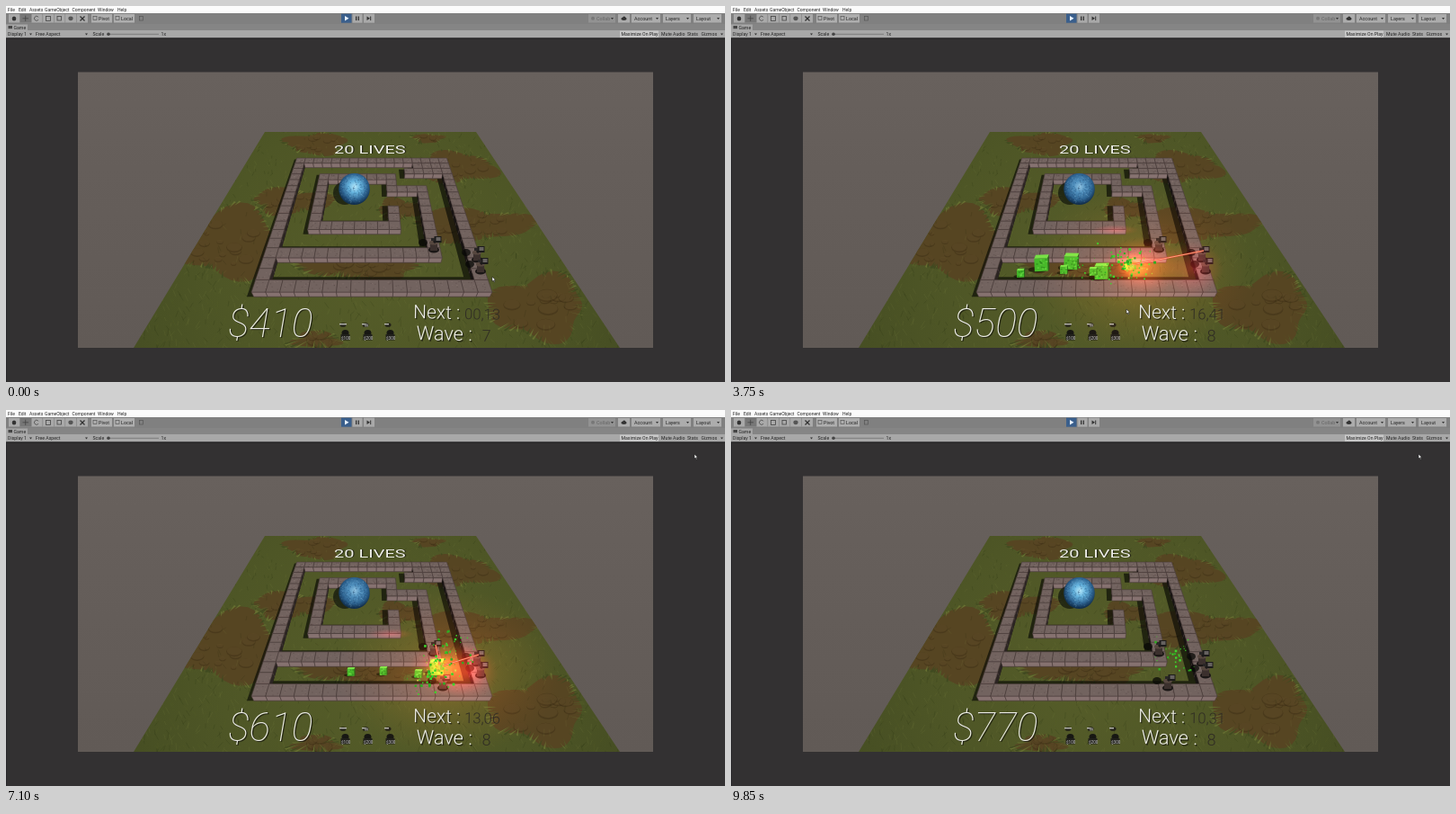
Animation, 800 px wide and 418 px high, one loop 9.9 s. Source, as an HTML page with a canvas:

```html
<!DOCTYPE html>
<html>
<head>
<meta charset="utf-8">
<style>
html, body { margin: 0; width: 100%; height: 100%; overflow: hidden; background: #333132; }
canvas { display: block; }
</style>
</head>
<body>
<canvas id="stage" width="800" height="418"></canvas>
<script>
const LOOP = 9900, W = 800, H = 418, TAU = Math.PI * 2;
const stage = document.getElementById('stage').getContext('2d');
const backdrop = document.createElement('canvas');
backdrop.width = W;
backdrop.height = H;
let g = backdrop.getContext('2d');

function random(seed) {
  return () => {
    seed = seed + 0x6D2B79F5 | 0;
    let n = Math.imul(seed ^ seed >>> 15, 1 | seed);
    n = n + Math.imul(n ^ n >>> 7, 61 | n) ^ n;
    return ((n ^ n >>> 14) >>> 0) / 4294967296;
  };
}
function box(x, y, w, h, fill) { g.fillStyle = fill; g.fillRect(x, y, w, h); }
function oval(x, y, rx, ry, fill) {
  g.fillStyle = fill;
  g.beginPath();
  g.ellipse(x, y, rx, ry, 0, 0, TAU);
  g.fill();
}
function trace(points) {
  points.forEach(([x, y], i) => i ? g.lineTo(x, y) : g.moveTo(x, y));
  g.closePath();
}
function poly(points, fill, edge) {
  g.beginPath();
  trace(points);
  g.fillStyle = fill;
  g.fill();
  if (edge) { g.strokeStyle = edge; g.lineWidth = .6; g.stroke(); }
}
function line(x1, y1, x2, y2, color, width) {
  g.strokeStyle = color;
  g.lineWidth = width;
  g.beginPath();
  g.moveTo(x1, y1);
  g.lineTo(x2, y2);
  g.stroke();
}
function text(str, x, y, size, fill, style = '400') {
  g.font = `${style} ${size}px Roboto, sans-serif`;
  g.fillStyle = fill;
  g.fillText(str, x, y);
}
function radial(x, y, r, stops) {
  const grad = g.createRadialGradient(x, y, 0, x, y, r);
  stops.forEach(([at, color]) => grad.addColorStop(at, color));
  return grad;
}

// Grid point to screen; z is the depth below the wall tops.
function project(col, row, z = 0) {
  const s = 1 / (.06346 + .00226 * (17 - row) + .0021 * z);
  return [407 + (col - 8.5) * s, -77 + s * (25.07 + 1.38 * z)];
}
const FLOOR = .6;

// Wall runs: first column, first row, last column, last row.
const RUNS = [
  [0, 0, 16, 0], [0, 1, 0, 16], [16, 1, 16, 16], [1, 16, 15, 16], [1, 13, 13, 13],
  [13, 1, 15, 1], [12, 2, 15, 2], [3, 3, 10, 3], [3, 4, 3, 10], [4, 10, 10, 10],
  [10, 8, 10, 9], [10, 4, 10, 4], [10, 5, 13, 5], [13, 6, 13, 12]
];

function arrow(x, y) { poly([[x, y], [x + 3, y], [x + 1.5, y + 2]], '#333'); }

function drawEditor() {
  box(0, 0, W, H, '#333132');
  box(0, 0, W, 8, '#fbfbfb');
  box(0, 8, W, 12, '#808080');
  box(0, 20, W, 7.5, '#858585');
  box(0, 20.5, 24, 7, '#a5a5a5');
  box(0, 27, W, 8.5, '#a8a8a8');
  box(0, 35.5, W, 1.2, '#242324');
  box(0, 36, 1, H, '#28272a');

  [['File', 2], ['Edit', 14], ['Assets', 26], ['GameObject', 43], ['Component', 73.5], ['Window', 102], ['Help', 124]]
    .forEach(([s, x]) => text(s, x, 5.6, 5, '#222'));

  box(3, 9, 88, 9.5, '#a9a9a9');
  box(15.5, 9, 12.5, 9.5, '#777');
  for (let i = 1; i < 7; i++) box(3 + i * 12.5, 9, .6, 9.5, '#808080');
  oval(9, 14, 2.3, 2.5, '#333');
  line(18.5, 13.8, 25, 13.8, '#444', .8);
  line(21.7, 10.7, 21.7, 17, '#444', .8);
  g.strokeStyle = '#444';
  g.beginPath();
  g.arc(34, 13.8, 2.5, .6, 5.6);
  g.stroke();
  [[44.5, 5], [57, 4.5]].forEach(([x, s]) => g.strokeRect(x, 11.5, s, s));
  oval(72, 13.8, 2.6, 2.4, '#555');
  line(82.5, 11.5, 87.5, 16.5, '#333', 1.2);
  line(87.5, 11.5, 82.5, 16.5, '#333', 1.2);
  [[95, 23, 'Pivot'], [120, 23, 'Local']].forEach(([x, w, s]) => {
    box(x, 9, w, 9.5, '#aeaeae');
    g.strokeStyle = '#555';
    g.lineWidth = .7;
    g.strokeRect(x + 2, 11.5, 4, 4);
    text(s, x + 8, 15.7, 5.4, '#222');
  });
  g.strokeRect(148.5, 11.5, 4, 4.5);

  box(373, 8.7, 11.5, 10, '#3a5f8c');
  box(385.5, 8.7, 11, 10, '#a9a9a9');
  box(398, 8.7, 12, 10, '#a9a9a9');
  poly([[377, 11], [381.5, 13.7], [377, 16.4]], '#e8f2ff');
  box(389, 11.5, 1.3, 4.6, '#333');
  box(391.6, 11.5, 1.3, 4.6, '#333');
  poly([[401.5, 11.5], [405, 13.8], [401.5, 16]], '#333');
  box(405.2, 11.5, 1, 4.6, '#333');

  [[648, 30, 'Collab', '#666'], [696, 32, 'Account', '#222'], [731, 31, 'Layers', '#222'], [765, 31, 'Layout', '#222']]
    .forEach(([x, w, s, c]) => {
      box(x, 9, w, 9.5, s === 'Collab' ? '#929292' : '#acacac');
      text(s, x + (s === 'Collab' ? 9 : 3), 15.7, 5.4, c);
      arrow(x + w - 5, 13);
    });
  oval(653, 13.7, 2, 2, '#777');
  box(681, 9, 13, 9.5, '#acacac');
  oval(687.5, 14.3, 3, 1.7, '#333');
  oval(687.8, 13, 1.6, 1.6, '#333');

  box(2.5, 22, 4.5, 3.2, '#444');
  text('Game', 8.5, 25.7, 5.2, '#222');
  box(683, 27.5, 43, 7.5, '#c8c8c8');
  [['Display 1', 2], ['Free Aspect', 33], ['Scale', 96.5], ['1x', 172.5], ['Maximize On Play', 684.5],
    ['Mute Audio', 729], ['Stats', 758], ['Gizmos', 773.5]].forEach(([s, x]) => text(s, x, 33.1, 5.2, '#222'));
  [26, 88, 795].forEach(x => arrow(x, 30.5));
  line(113, 31.3, 170, 31.3, '#707070', .8);
  oval(114, 31.3, 1.8, 1.8, '#444');
}

function drawGround() {
  const sky = g.createLinearGradient(0, 73, 0, 380);
  sky.addColorStop(0, '#68615d');
  sky.addColorStop(.35, '#655e5a');
  sky.addColorStop(1, '#615a56');
  box(80, 73.5, 640, 306.5, sky);

  g.save();
  g.beginPath();
  trace([[288, 140], [523, 140], [683, 380], [142, 380]]);
  g.clip();
  box(140, 140, 550, 240, radial(410, 290, 290, [[0, '#565d29'], [.6, '#4e5626'], [1, '#464e23']]));

  const rnd = random(7);
  const blades = (n, tones) => {
    for (let i = 0; i < n; i++) {
      const y = 140 + 245 * rnd(), x = 140 + 550 * rnd(), size = (y + 65) / 80;
      const lean = (rnd() - .5) * size * 2;
      line(x, y, x + lean, y - size * (.6 + rnd()), tones[i % tones.length], .7);
    }
  };
  blades(1800, ['rgba(34,44,14,.25)', 'rgba(124,134,64,.22)', 'rgba(86,98,40,.3)']);

  const patches = [
    [345, 153, 33, 12], [502, 180, 42, 17], [242, 262, 58, 38], [592, 335, 52, 35], [520, 243, 66, 18],
    [318, 217, 44, 14], [395, 291, 66, 13], [438, 226, 25, 12], [345, 371, 26, 9], [470, 147, 17, 5]
  ];
  for (const [px, py, rx, ry] of patches) {
    const phase = rnd() * 6;
    const rim = a => {
      const k = 1 + .16 * Math.sin(3 * a + phase) + .1 * Math.sin(5 * a - phase);
      return [px + rx * k * Math.cos(a), py + ry * k * Math.sin(a)];
    };
    const edge = Array.from({ length: 48 }, (_, i) => rim(i / 48 * TAU));
    poly(edge, '#564522');
    for (let i = 0; i < rx / 4; i++) {
      const a = rnd() * TAU, d = Math.sqrt(rnd()) * .7, r = (1.5 + rnd() * 4) * py / 250;
      const x = px + rx * d * Math.cos(a), y = py + ry * d * Math.sin(a);
      oval(x, y + .8, r * 1.6, r, 'rgba(48,34,16,.3)');
      oval(x, y, r * 1.5, r * .85, 'rgba(106,86,46,.4)');
    }
    const size = py / 34;
    for (let i = 0; i < rx * 1.6; i++) {
      const a = rnd() * TAU, [x, y] = rim(a), len = size * (.6 + rnd() * .7);
      const dx = Math.cos(a + rnd() - .5) * len, dy = Math.sin(a) * len * .6;
      poly([[x + dx * .4 - 1, y + dy * .4], [x + dx * .4 + 1, y + dy * .4 + 1], [x - dx, y - dy - 1]],
        ['#525b27', '#666f31', '#404a20'][i % 3]);
    }
  }
  blades(400, ['rgba(150,160,80,.15)', 'rgba(25,30,8,.2)']);
  g.restore();
}

function drawMaze() {
  const blocks = [];
  for (const [c0, r0, c1, r1] of RUNS)
    for (let r = r0; r <= r1; r++)
      for (let c = c0; c <= c1; c++) blocks.push([c, r]);
  blocks.sort((a, b) => a[1] - b[1] || Math.abs(b[0] - 8) - Math.abs(a[0] - 8));

  g.beginPath();
  for (const [c, r] of blocks)
    trace([[c - .5, r - .65], [c + 1, r - .65], [c + 1, r + 1], [c - .5, r + 1]]
      .map(([x, y]) => project(x, y, FLOOR)));
  g.fillStyle = 'rgba(10,11,5,.68)';
  g.fill();

  const rnd = random(21);
  for (const [c, r] of blocks) {
    const side = c < 8 ? c + 1 : c;
    poly([project(side, r), project(side, r + 1), project(side, r + 1, FLOOR), project(side, r, FLOOR)],
      c < 8 ? '#2b2422' : '#171312');
    const a = project(c, r + 1), b = project(c + 1, r + 1);
    poly([a, b, project(c + 1, r + 1, FLOOR), project(c, r + 1, FLOOR)], '#867270', '#4a3d3c');
    const p = project(c, r), q = project(c + 1, r);
    poly([p, q, b, a], '#72635f', '#483c3a');
    for (let i = 0; i < 8; i++) {
      const u = .1 + rnd() * .8, v = .1 + rnd() * .8, [x, y] = project(c + u, r + v);
      box(x, y, 1.4, .9, i % 2 ? 'rgba(165,140,135,.22)' : 'rgba(50,35,35,.2)');
    }
  }
}

function drawShop() {
  [375, 400, 425].forEach((x, i) => {
    oval(x, 354.5, 3.5, 2.3, '#222119');
    box(x - 4, 353, i ? 5 : 8, 1.4, '#b9b9b2');
    if (i === 1) box(x - 1, 353.5, 4, 3, '#74746e');
    oval(x + 2.5, 363.5, 4, 3.5, '#171713');
    box(x - 2.5, 365, 10, 6.5, '#20201b');
    text('$' + (i + 1) + '00', x - 2, 370.5, 4.6, '#ccc');
  });
}

drawEditor();
drawGround();
drawMaze();
drawShop();

// Enemies: big?, x at a known time, that time, lane y, time of death.
const BIG = 1, SMALL = 0, ENTRY = 304;
const enemies = [
  [BIG, 406, 2450, 287, 3320], [BIG, 360, 2450, 295, 4900], [BIG, 326, 2450, 284, 6550], [BIG, 345, 3750, 286, 7500],
  [SMALL, 391, 2450, 287, 2950], [SMALL, 374, 2450, 289, 3900], [SMALL, 335, 2450, 295, 5300],
  [SMALL, 370, 3750, 293, 5950], [SMALL, 322, 3750, 297, 6650], [SMALL, 391, 5800, 293, 7800],
  [SMALL, 352, 5800, 290, 8400], [SMALL, 316, 5800, 291, 9250]
].map(([big, x, at, lane, dies]) => {
  const speed = (big ? 40 : 52) / 1000;
  return { big, lane, dies, speed, born: Math.max(150, at - (x - ENTRY) / speed), x, at };
});
function place(e, t) {
  const x = e.x + (Math.min(t, e.dies) - e.at) * e.speed;
  return [Math.min(x, 493), e.lane - Math.max(0, x - 480) * 1.3];
}

// Fire: start, end, enemy index, turret bit mask.
const fire = [
  [1750, 3320, 0, 7], [3400, 3900, 5, 2], [3950, 4900, 1, 7], [4950, 5300, 6, 5], [5350, 5950, 7, 6],
  [5950, 6550, 2, 14], [6600, 7500, 3, 3], [7500, 7800, 9, 14], [7850, 8700, 10, 4], [8750, 9250, 11, 6]
];
const turrets = [[476, 267, 0], [524, 278, 0], [528, 291, 0], [486, 305, 5000]];
const money = [[0, 410], [3330, 460], [3600, 500], [4400, 510], [5000, 410], [5950, 460], [6550, 560],
  [6900, 610], [7500, 660], [7800, 690], [8400, 710], [9250, 770]];
const pointer = [[0, 542, 302], [2450, 486, 308], [3750, 441, 338], [4300, 405, 362], [5000, 487, 303],
  [5800, 504, 312], [6200, 520, 300], [6800, 767, 50], [9900, 766, 50]];

function drawCube(e, t) {
  const [x, y] = place(e, t), s = e.big ? 15 : 8;
  const grow = Math.min(1, (t - e.born) / 150);
  oval(x - s * .25, y + s * .48, s * .7, s * .22, 'rgba(8,15,2,.6)');
  g.save();
  g.translate(x, y);
  g.rotate(.04 * Math.sin(t / 260 + e.lane + e.x));
  g.scale(grow, grow);
  const h = s / 2;
  box(-h, -h * .75, s, s * .97, '#43b82a');
  poly([[-h, -h * .75], [-h + s * .13, -h * 1.25], [h + s * .1, -h * 1.25], [h, -h * .75]], '#74e046');
  poly([[h, -h * .75], [h + s * .1, -h * 1.25], [h + s * .1, h * .9], [h, h * 1.19]], '#1e6616');
  const rnd = random(Math.round(e.x));
  for (let i = 0; i < s; i++)
    box(-h + rnd() * (s - 2), -h * .7 + rnd() * s * .85, 2, 1.5, i % 2 ? 'rgba(120,235,80,.5)' : 'rgba(25,105,20,.45)');
  g.restore();
}

function drawTurret([x, y]) {
  oval(x - 12, y - 4, 5, 4, 'rgba(8,8,6,.75)');
  oval(x, y + 4, 6, 3.6, '#1b1716');
  box(x - 4, y - 4, 8, 9, '#3b302d');
  oval(x, y - 4, 5, 2.6, '#56473f');
  line(x, y - 4, x + 4, y - 8, '#191717', 3);
  box(x + .5, y - 11, 8, 7, '#1c1b1b');
  box(x + 2.5, y - 10, 5, 4, '#65615f');
  box(x - 3, y - 9, 4, 3, '#292626');
}

function drawOrb(calm) {
  oval(377, 208, 13, 13, 'rgba(5,9,6,.6)');
  oval(387.5, 203.5, 17.3, 17.6,
    radial(388, 201, 19, [[0, calm ? '#b7e9fb' : '#8fc3e2'], [.35, calm ? '#65b4df' : '#4f8fbd'], [.75, '#2d628f'], [1, '#12304e']]));
  const rnd = random(5);
  for (let i = 0; i < 170; i++) {
    const a = rnd() * TAU, d = Math.sqrt(rnd()) * 16;
    box(387 + d * Math.cos(a), 203 + d * Math.sin(a), 1.2, 1, i % 2 ? 'rgba(170,220,245,.2)' : 'rgba(15,45,85,.3)');
  }
}

function drawLight(x, y, flicker) {
  g.save();
  g.beginPath();
  g.rect(80, 73, 640, 307);
  g.clip();
  g.globalCompositeOperation = 'lighter';
  const glow = (cx, cy, r, flat, stops) => {
    g.save();
    g.translate(cx, cy);
    g.scale(1, flat);
    g.fillStyle = radial(0, 0, r, stops);
    g.fillRect(-r, -r, 2 * r, 2 * r);
    g.restore();
  };
  glow(x + 14, y + 6, 125, .75, [[0, `rgba(120,45,10,${.6 * flicker})`], [.5, 'rgba(80,30,6,.28)'], [1, 'rgba(50,12,0,0)']]);
  glow(x + 16, y, 46, .7, [[0, `rgba(190,50,20,${.6 * flicker})`], [.5, 'rgba(150,22,15,.35)'], [1, 'rgba(90,0,0,0)']]);
  glow(x + 6, y, 19, .85, [[0, `rgba(235,150,50,${.6 * flicker})`], [1, 'rgba(190,50,0,0)']]);
  glow(514, 292, 34, .9, [[0, 'rgba(170,15,35,.45)'], [1, 'rgba(120,0,15,0)']]);
  glow(428, 249, 26, .22, [[0, 'rgba(150,20,35,.4)'], [1, 'rgba(120,0,15,0)']]);
  g.restore();
}

function drawBurst(e, t, seed) {
  const age = (t - e.dies) / 1000;
  if (age < 0 || age > 1.1) return;
  const [x, y] = place(e, e.dies), rnd = random(seed), n = e.big ? 46 : 38;
  const ease = 1 - Math.exp(-4 * age);
  for (let i = 0; i < n; i++) {
    const a = rnd() * TAU, d = rnd() * 36 * ease, life = .45 + rnd() * .75, s = (1 + rnd() * 2.5) * (1 - .4 * age);
    if (age > life) continue;
    const px = x + Math.cos(a) * d, py = y + Math.sin(a) * d * .8 - 14 * age + 20 * age * age;
    box(px, py, s, s, i % 3 || age > .35 ? (i % 2 ? '#3dd52c' : '#2fae22') : '#d8e83a');
  }
}

// Chips fly off the hit enemy, mostly back along the lane.
function drawSparks(x, y, t) {
  for (let i = 0; i < 38; i++) {
    const clock = t / 500 + i / 38, age = clock % 1;
    const rnd = random(i * 97 + Math.floor(clock));
    const dx = (rnd() - .55) * 60 * age, dy = (rnd() - .5) * 34 * age, s = (1.3 + rnd() * 2) * (1 - age * .5);
    box(x + 5 + dx, y + dy, s, s, ['#e6dd48', '#8cdc2d', '#c9c238'][i % 3]);
  }
}

function label(str, x, y, size, style) {
  text(str, x + 1.2, y + 1.3, size, 'rgba(20,20,14,.75)', style);
  text(str, x, y, size, '#eeeee8', style);
}

function drawHud(t) {
  g.save();
  g.translate(365, 163.6);
  g.scale(1, .68);
  label('20 LIVES', 0, 0, 20, '400');
  g.restore();
  const cash = money.filter(m => m[0] <= t).pop()[1];
  label('$' + cash, 247, 367.5, 44.5, 'italic 200');
  const left = (t < 150 ? 130 - t : 20160 - t) / 1000;
  const clock = Math.max(0, left).toFixed(2).padStart(5, '0').replace('.', ',');
  g.save();
  g.translate(453, 347);
  g.rotate(.018);
  label('Next :', 0, 0, 21, '300');
  text(clock, 57, 0, 16.6, '#302d24', '300');
  label('Wave :', 4, 24, 21.8, '300');
  text(t < 150 ? '7' : '8', 77, 24.3, 18, '#302d24', '300');
  g.restore();
}

function drawPointer(t) {
  const i = pointer.findIndex(p => p[0] > t), [t0, x0, y0] = pointer[i - 1], [t1, x1, y1] = pointer[i];
  const u = (t - t0) / (t1 - t0), k = u * u * (3 - 2 * u);
  const x = x0 + (x1 - x0) * k, y = y0 + (y1 - y0) * k;
  poly([[0, 0], [0, 5], [1.2, 4], [2.2, 6], [3, 5.6], [2.1, 3.7], [3.6, 3.5]].map(p => [x - 1 + p[0], y - 1 + p[1]]),
    '#fff', '#222');
}

function draw(t) {
  g = stage;
  g.drawImage(backdrop, 0, 0);
  const shot = fire.find(f => t >= f[0] && t < f[1]);
  drawOrb(!shot);

  enemies.filter(e => t >= e.born && t < e.dies)
    .sort((a, b) => place(a, t)[1] - place(b, t)[1])
    .forEach(e => drawCube(e, t));
  turrets.forEach(turret => { if (t >= turret[2]) drawTurret(turret); });

  if (shot) {
    const [x, y] = place(enemies[shot[2]], t);
    drawLight(x, y, .88 + .12 * Math.sin(t / 37));
    turrets.forEach(([tx, ty, from], i) => {
      if (t < from || !(shot[3] >> i & 1)) return;
      line(tx + 2, ty - 6, x + 4, y - 1, 'rgba(255,45,35,.6)', 2.2);
      line(tx + 2, ty - 6, x + 4, y - 1, '#ffb48a', .9);
    });
    oval(x + 5, y, 7, 6, radial(x + 5, y, 7, [[0, 'rgba(255,240,160,.85)'], [.35, 'rgba(255,170,50,.5)'], [1, 'rgba(255,70,10,0)']]));
    drawSparks(x, y, t);
  }
  enemies.forEach((e, i) => drawBurst(e, t, 300 + i * 13));
  drawHud(t);
  drawPointer(t);
}

const start = performance.now();
function tick() {
  draw((performance.now() - start) % LOOP);
  requestAnimationFrame(tick);
}
tick();
</script>
</body>
</html>
```
